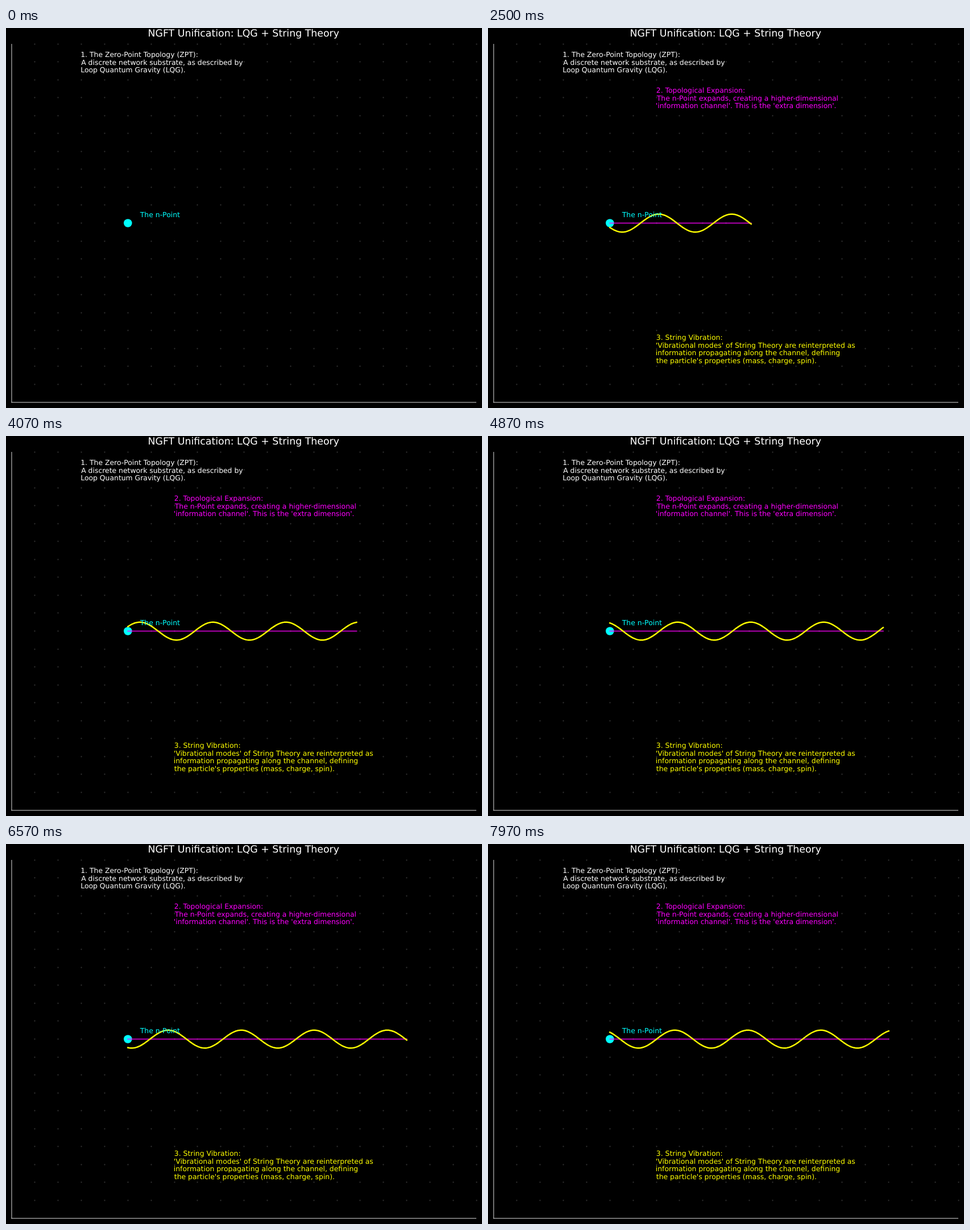
Animation of 837x669 px, one loop 8000 ms. Source, as an HTML page with a canvas:

```html
<!DOCTYPE html>
<html lang="en">
<head>
<meta charset="utf-8">
<title>NGFT Unification</title>
<style>
  html, body { margin: 0; width: 100%; height: 100%; overflow: hidden; background: #000; }
  canvas { display: block; }
</style>
</head>
<body>
<canvas id="stage" width="837" height="669"></canvas>
<script>
const ctx = document.getElementById('stage').getContext('2d');
const LOOP = 8000, LAST_FRAME = 239;
const START = 5, MAX_LENGTH = 12, MIDDLE = 10;

// The plot spans 20 by 20 units.
const px = x => 10 + x * 40.86;
const py = y => 659 - y * 31.55;

function disc(x, y, radius, color) {
  ctx.fillStyle = color;
  ctx.beginPath();
  ctx.arc(x, y, radius, 0, 2 * Math.PI);
  ctx.fill();
}

// Each line is aligned by the left edge of its ink.
function textBlock(lines, x, baseline, color, size = 12.4) {
  ctx.font = `${size}px "DejaVu Sans", sans-serif`;
  ctx.textRendering = 'geometricPrecision';
  ctx.fillStyle = color;
  lines.forEach((line, i) => {
    const inkOffset = ctx.measureText(line).actualBoundingBoxLeft;
    ctx.fillText(line, x + inkOffset, baseline + i * 13.5);
  });
}

function drawBackground() {
  ctx.fillStyle = '#000';
  ctx.fillRect(0, 0, 837, 669);
  for (let i = 1; i <= 20; i++) {
    for (let j = 1; j <= 20; j++) {
      disc(Math.floor(px(i)) + 0.5, Math.floor(py(j)) + 0.5, 1.15, '#303030');
    }
  }
  ctx.fillStyle = '#c8c8c8';
  ctx.fillRect(9.4, 28, 1.1, 631.5);
  ctx.fillRect(9.4, 658.5, 817.6, 1.1);
}

function drawChannel(length) {
  ctx.lineWidth = 2;
  ctx.lineCap = 'square';
  ctx.strokeStyle = 'rgba(255, 0, 255, 0.7)';
  ctx.beginPath();
  ctx.moveTo(px(START), py(MIDDLE));
  ctx.lineTo(px(START + length), py(MIDDLE));
  ctx.stroke();
}

function drawWave(length, phase) {
  const points = 200;
  ctx.lineWidth = 2.48;
  ctx.lineCap = 'square';
  ctx.lineJoin = 'round';
  ctx.strokeStyle = '#ff0';
  ctx.beginPath();
  for (let i = 0; i <= points; i++) {
    const x = length * i / points;
    ctx.lineTo(px(START + x), py(MIDDLE + 0.5 * Math.sin(2 * x - phase)));
  }
  ctx.stroke();
}

function drawFrame(frame) {
  const step = frame + 1;
  const length = Math.min(MAX_LENGTH, 0.08 * step);
  const expanding = frame >= 1, vibrating = frame >= 51;

  drawBackground();
  disc(px(START), py(MIDDLE), 7.3, '#0ff');
  if (expanding) drawChannel(length);
  if (vibrating) drawWave(length, 0.2 * step);

  textBlock(['NGFT Unification: LQG + String Theory'], 250.5, 15.3, '#fff', 17.36);
  textBlock(['The n-Point'], 234.8, 332.5, '#0ff');
  textBlock([
    '1. The Zero-Point Topology (ZPT):',
    'A discrete network substrate, as described by',
    'Loop Quantum Gravity (LQG).'
  ], 132.2, 51, '#fff');
  if (expanding) textBlock([
    '2. Topological Expansion:',
    'The n-Point expands, creating a higher-dimensional',
    "'information channel'. This is the 'extra dimension'."
  ], 295.8, 114.2, '#f0f');
  if (vibrating) textBlock([
    '3. String Vibration:',
    "'Vibrational modes' of String Theory are reinterpreted as",
    'information propagating along the channel, defining',
    "the particle's properties (mass, charge, spin)."
  ], 295.8, 549, '#ff0');
}

const origin = performance.now();
function tick() {
  const time = (performance.now() - origin) % LOOP;
  // 30 frames per second, with starts rounded to 10 ms
  drawFrame(Math.min(LAST_FRAME, Math.floor((time + 5) * 0.03)));
  requestAnimationFrame(tick);
}
tick();
</script>
</body>
</html>
```
